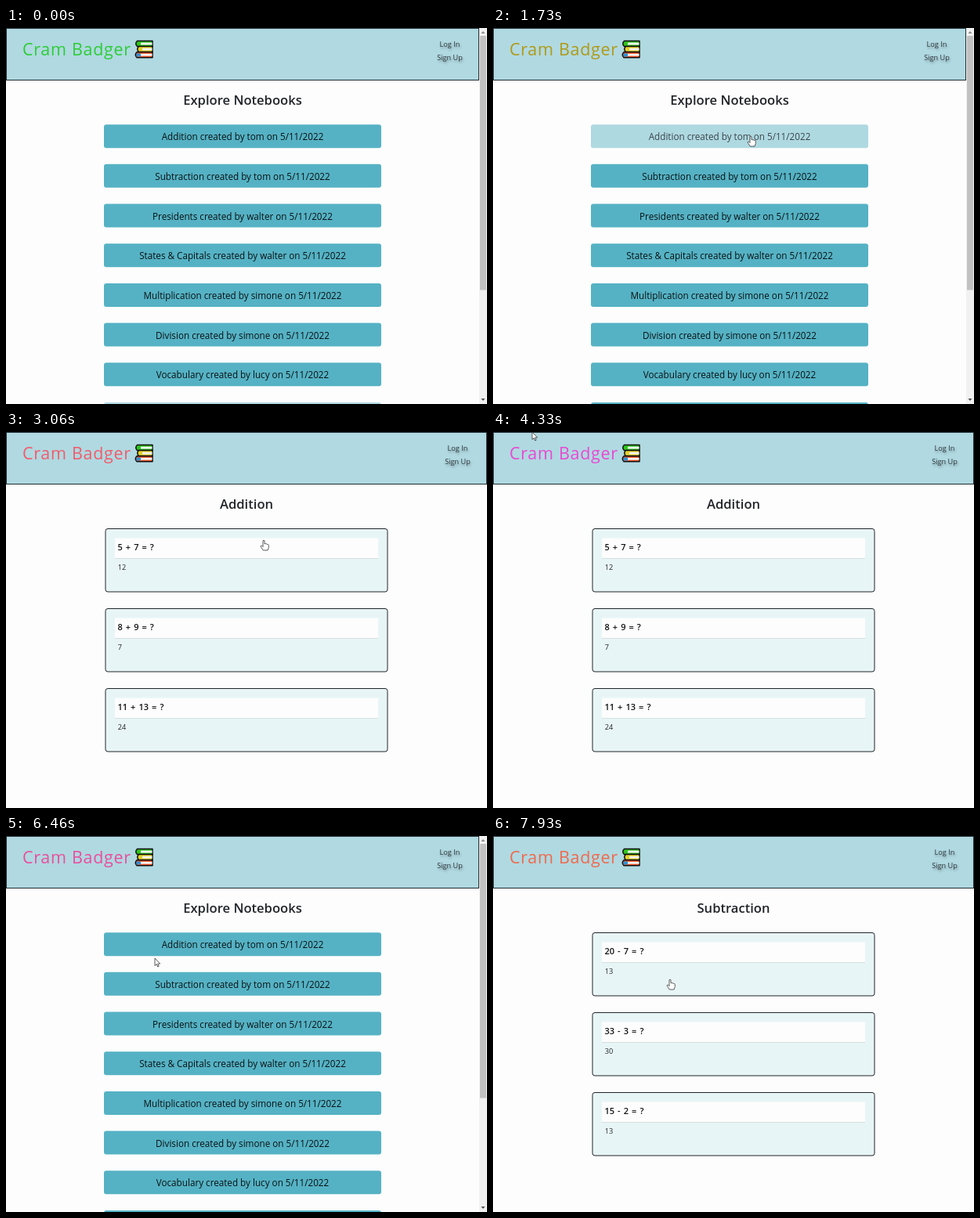
An HTML page for the animation above (8000 ms loop, 614 px wide and 480 px high).

```html
<!DOCTYPE html>
<html lang="en">
<head>
<meta charset="utf-8">
<title>Notebooks</title>
<style>
  html, body { margin: 0; width: 100%; height: 100%; overflow: hidden; background: #fdfdfd; }
  svg { display: block; width: 614px; height: 480px; font-family: "Open Sans", "Noto Sans", sans-serif; }
  .brand { font-size: 21.5px; font-weight: 500; letter-spacing: .7px; }
  .link { font-size: 9.2px; fill: #30383d; text-anchor: middle; filter: drop-shadow(1px 2px 1.5px rgba(0, 0, 0, .35)); }
  .head { font-size: 16.6px; font-weight: 600; fill: #212529; text-anchor: middle; }
  .item { font-size: 11.7px; text-anchor: middle; }
  .ask { font-size: 11px; font-weight: 600; fill: #111; word-spacing: 1.2px; }
  .answer { font-size: 9.2px; fill: #212529; }
</style>
</head>
<body>
<svg id="stage" viewBox="0 0 614 480"></svg>
<script>
const LOOP = 8000;
const stage = document.getElementById('stage');

function add(parent, tag, attrs = {}, text = '') {
  const el = document.createElementNS('http://www.w3.org/2000/svg', tag);
  for (const k in attrs) el.setAttribute(k, attrs[k]);
  el.textContent = text;
  parent.appendChild(el);
  return el;
}
const rect = (p, x, y, width, height, fill, more) => add(p, 'rect', { x, y, width, height, fill, ...more });
const label = (p, cls, x, y, text) => add(p, 'text', { class: cls, x, y }, text);
const path = (p, d, fill, more) => add(p, 'path', { d, fill, ...more });
const show = (el, on) => el.setAttribute('visibility', on ? 'visible' : 'hidden');

rect(stage, 0, 0, 614, 480, '#fdfdfd');

// Header
const bar = rect(stage, .5, .5, 613, 66, '#b0d9e1', { stroke: '#1f2b30' });
const brand = label(stage, 'brand', 21, 35, 'Cram Badger');
const links = add(stage, 'g');
label(links, 'link', 566.5, 24, 'Log In');
label(links, 'link', 566.5, 40.7, 'Sign Up');

// Stack of books
const books = add(stage, 'g', { stroke: '#111', 'stroke-width': 1.5, 'stroke-linejoin': 'round' });
[[165, 16.5, '#2fc51c'], [167, 23.5, '#e6d32a'], [164.5, 30.7, '#ee5326']].forEach(([x, y, color]) => {
  path(books, `M${x + 2.5} ${y}H187V${y + 7}H${x + 2.5}Q${x - 1} ${y + 3.5} ${x + 2.5} ${y}Z`, color);
  rect(books, x + 7, y + 2.2, 186.5 - x - 7, 2.8, '#f4f4f4', { stroke: 'none' });
});
rect(books, 166.5, 32.5, 5.5, 4, '#2f8fd0', { stroke: 'none' });

// Notebook list
const list = add(stage, 'g');
label(list, 'head', 302, 98, 'Explore Notebooks');
const items = [
  'Addition created by tom', 'Subtraction created by tom', 'Presidents created by walter',
  'States & Capitals created by walter', 'Multiplication created by simone',
  'Division created by simone', 'Vocabulary created by lucy', 'Spelling created by lucy'
].map((name, i) => {
  const y = 123.2 + i * 50.67;
  return {
    y,
    box: rect(list, 125, y, 354, 30, '#55b2c4', { rx: 3 }),
    text: label(list, 'item', 302, y + 20, name + ' on 5/11/2022')
  };
});
rect(list, 604, 0, 10, 480, '#f1f1f1');
rect(list, 605, 10, 8, 324.5, '#c1c1c1');
path(list, 'M606.5 7L609 4L611.5 7Z', '#8a8a8a');
path(list, 'M606.5 473L609 476L611.5 473Z', '#505050');

// Card pages
function cardPage(title, cards) {
  const g = add(stage, 'g');
  label(g, 'head', 307, 98, title);
  cards.forEach(([ask, answer], i) => {
    const y = 123.5 + i * 102;
    rect(g, 127, y, 360, 80.5, '#e8f5f6', { rx: 3, stroke: '#212529' });
    rect(g, 139, y + 12, 336, 26, '#fdfdfd');
    rect(g, 139, y + 37.5, 336, 1, '#d5dfe0');
    label(g, 'ask', 142.5, y + 27.2, ask);
    label(g, 'answer', 142.7, y + 52.5, answer);
  });
  return g;
}
const addition = cardPage('Addition', [['5 + 7 = ?', 12], ['8 + 9 = ?', 7], ['11 + 13 = ?', 24]]);
const subtraction = cardPage('Subtraction', [['20 - 7 = ?', 13], ['33 - 3 = ?', 30], ['15 - 2 = ?', 13]]);

// Pointers, hotspot at 0,0
const pen = { stroke: '#333', 'stroke-width': .8, 'stroke-linejoin': 'round' };
const arrow = path(stage, 'M0 0V9.6L2.2 7.6L3.7 11L5.2 10.3L3.7 7.1H6.7Z', '#fff', pen);
const hand = path(stage,
  'M-1 .8Q0 -.8 1 .8V4.6Q2 3.8 2.9 5Q4 4.2 4.7 5.5Q6 5 6.3 6.5V9.5L5 13H-.7L-3.8 8.3Q-4 6.6 -2.4 7.2L-1 8.6Z',
  '#fff', pen);

const visits = [
  { start: -7100, page: list },
  { start: 2450, page: addition },
  { start: 5050, page: list },
  { start: 7750, page: subtraction }
];

// Brand colour by time since the page opened: [ms, r, g, b]
const hues = [
  [0, 238, 112, 62], [610, 242, 92, 108], [1410, 234, 78, 158], [1880, 234, 72, 210],
  [2700, 200, 85, 235], [7100, 44, 205, 54], [8830, 176, 154, 24], [9650, 226, 116, 40]
];
const route = [
  [900, 420, 492], [1450, 329, 138], [3500, 329, 138], [4150, 50, 0], [5400, 50, 0],
  [6300, 190, 156], [6700, 190, 156], [7100, 226, 183], [8000, 226, 183]
];

function sample(keys, t, ease = u => u) {
  if (t <= keys[0][0]) return keys[0].slice(1);
  const i = keys.findIndex(k => k[0] > t);
  if (i < 0) return keys[keys.length - 1].slice(1);
  const a = keys[i - 1], b = keys[i];
  const u = ease((t - a[0]) / (b[0] - a[0]));
  return a.slice(1).map((v, j) => v + (b[j + 1] - v) * u);
}
const smooth = u => u * u * (3 - 2 * u);

function draw(t) {
  const { start, page } = visits.filter(v => v.start <= t).pop();
  const onList = page === list;
  [list, addition, subtraction].forEach(p => show(p, p === page));
  bar.setAttribute('width', onList ? 603 : 613);
  links.setAttribute('transform', `translate(${onList ? 0 : 10} 0)`);
  brand.setAttribute('fill', `rgb(${sample(hues, t - start).map(Math.round)})`);

  const [x, y] = sample(route, t, smooth);
  let hovering = false;
  items.forEach(item => {
    const over = onList && x > 125 && x < 479 && y >= item.y && y <= item.y + 30;
    hovering = hovering || over;
    item.box.setAttribute('fill', over ? '#afd9e1' : '#55b2c4');
    item.text.setAttribute('fill', over ? '#3b454a' : '#0b1214');
  });
  // The hand stays after a click until the pointer moves
  const useHand = hovering || (!onList && (t <= 3500 || t > 7100));
  show(hand, useHand);
  show(arrow, !useHand);
  (useHand ? hand : arrow).setAttribute('transform', `translate(${x} ${y})`);
}

function tick() {
  draw(performance.now() % LOOP);
  requestAnimationFrame(tick);
}
tick();
</script>
</body>
</html>
```
